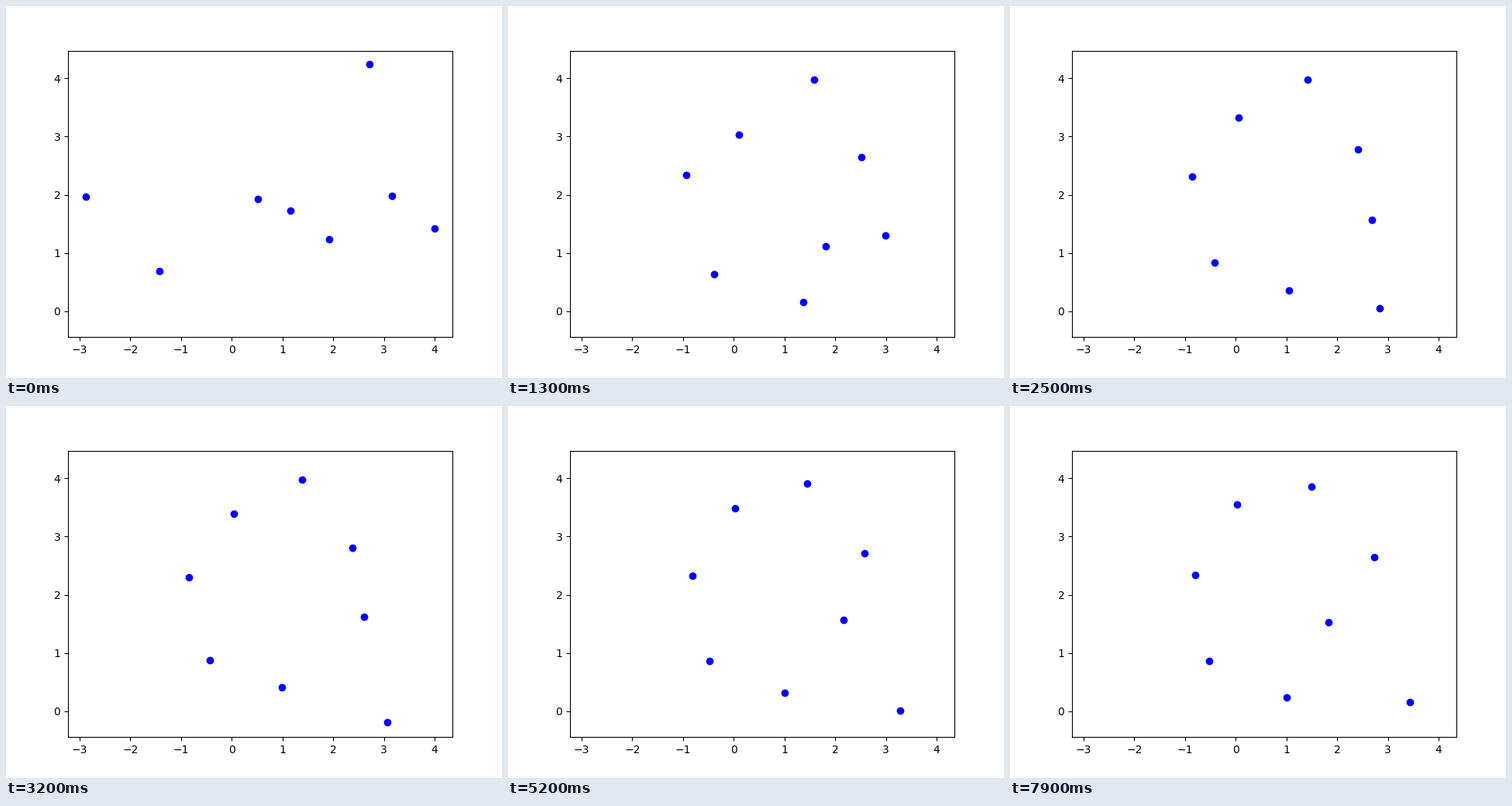
Recreate the animation shown at these times as a matplotlib script. Size 640 by 480 pixels, loop 8000 ms.

```python
import numpy as np
import matplotlib.pyplot as plt
from matplotlib.animation import FuncAnimation
from matplotlib.transforms import Affine2D

W, H, DPI = 640, 480, 100
FRAMES, STEP = 80, 100

# One row per dot, stage pixels (y down): start, loose ring, after the swap, end
PATHS = np.array([
    [(103, 246), (232, 216), (236, 221), (239, 218)],
    [(198, 342), (270, 354), (263, 328), (257, 329)],
    [(325, 249), (299, 176), (294, 139), (293, 127)],
    [(469, 75), (399, 96), (382, 95), (389, 104)],
    [(498, 245), (459, 199), (447, 183), (470, 195)],
    [(553, 287), (496, 308), (463, 272), (411, 279)],
    [(367, 264), (373, 266), (492, 408), (516, 382)],
    [(417, 301), (392, 394), (356, 363), (357, 376)],
])


def settle(t):
    return 1 - np.exp(-2.9 * t)


def swap(t):
    u = np.clip((t - 0.2) / 2.95, 0, 1)
    return u * u * (3 - 2 * u)


def drift(t):
    u = np.clip((t - 3.15) / 4.75, 0, 1)
    return 1 - (1 - u) ** 1.5


def place(t):
    """Sum the three overlapping moves of every dot."""
    phases = np.array([settle(t), swap(t), drift(t)])
    moves = np.diff(PATHS, axis=1)
    return PATHS[:, 0] + np.einsum("p,dpc->dc", phases, moves)


fig, ax = plt.subplots(figsize=(W / DPI, H / DPI), dpi=DPI)
to_stage = Affine2D().scale(1, -1).translate(0, H)
dots, = ax.plot([], [], "bo", transform=to_stage)
ax.set_xlim(-3.2292, 4.3491)
ax.set_ylim(-0.4431, 4.4750)


def update(i):
    dots.set_data(*place(i * STEP / 1000).T)
    return dots,


anim = FuncAnimation(fig, update, frames=FRAMES, interval=STEP,
                     repeat=True, repeat_delay=0)
plt.show()
```
